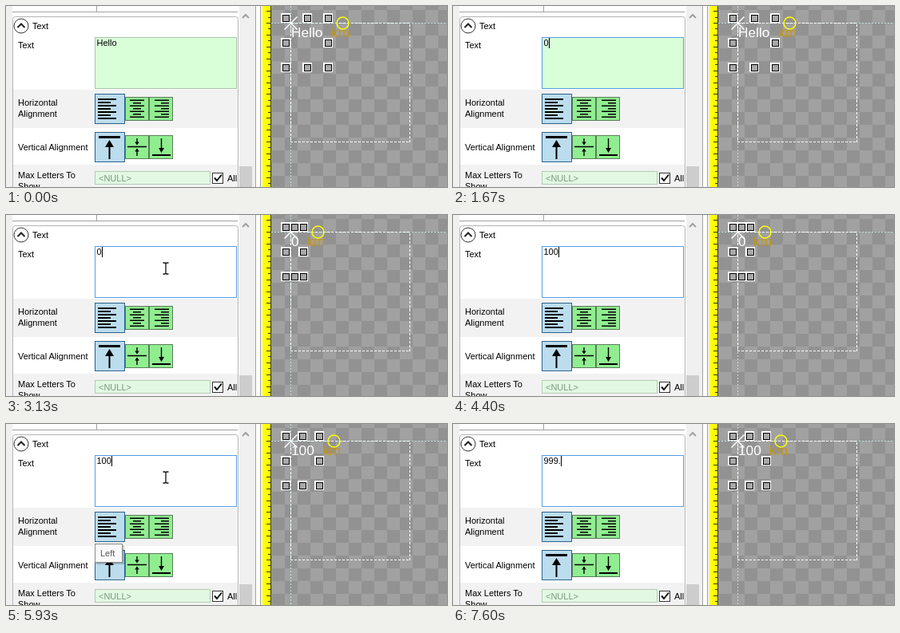
These frames come from a looping animation (552x227 px, 8 s). An HTML page:

```html
<!DOCTYPE html>
<html lang="en">
<head>
<meta charset="utf-8">
<title>Text property editor</title>
<style>
  html, body { margin: 0; width: 100%; height: 100%; overflow: hidden; background: #fff; }
  svg { display: block; width: 552px; height: 227px; }
  text { font: 11px "Liberation Sans", Arial, sans-serif; white-space: pre; }
  .view text { font-size: 17.3px; }
  .crisp { shape-rendering: crispEdges; }
</style>
</head>
<body>
<svg viewBox="0 0 552 227">
  <defs>
    <pattern id="checks" x="333" y="5" width="32" height="32" patternUnits="userSpaceOnUse">
      <path fill="#a1a1a1" d="M0 0h32v32H0z"/>
      <path fill="#929292" d="M16 0h16v16H16zM0 16h16v16H0z"/>
    </pattern>
  </defs>

  <!-- property rows -->
  <g class="crisp">
    <path fill="#f0f0f0" d="M0 0h8v227H0zM308 0h5v227h-5zM319 0h2v227h-2z"/>
    <path fill="#f2f2f2" d="M9 105h282v48H9zM9 199h282v28H9z"/>
    <path fill="none" stroke="#a0a0a0" d="M113.500 0V7M8 7.500H290M312.500 0V227M318.500 0V227"/>
    <path fill="#f0f0f0" d="M292 0h16v227h-16z"/>
    <path fill="#cdcdcd" d="M292 201h16v26h-16z"/>
  </g>
  <rect x="8.500" y="13.500" width="282" height="240" rx="3" fill="none" stroke="#b4b4b4"/>
  <path fill="none" stroke="#a0a0a0" stroke-width="2" d="M296 15l4-4 4 4"/>
  <circle cx="19" cy="25" r="9" fill="#fff" stroke="#333"/>
  <path fill="none" stroke="#222" stroke-width="2" d="M14.500 27l4.500-4.500 4.500 4.500"/>
  <text x="33" y="29">Text</text>
  <text x="15" y="53">Text</text>
  <text x="15" y="125">Horizontal</text>
  <text x="15" y="139">Alignment</text>
  <text x="15" y="181">Vertical Alignment</text>
  <text x="15" y="216">Max Letters To</text>
  <text x="15" y="230">Show</text>

  <!-- text box -->
  <g class="crisp">
    <rect id="box" x="111.500" y="39.500" width="177" height="64"/>
    <rect id="sel" x="114" y="40" height="13" fill="#0078d7" opacity=".4"/>
    <rect id="caret" y="40" width="1" height="13"/>
  </g>
  <text id="input" x="113.500" y="50"></text>

  <!-- alignment buttons -->
  <g id="buttons" class="crisp"></g>
  <rect id="dots" class="crisp" x="113.500" y="112.500" width="33" height="33" fill="none" stroke="#222" stroke-dasharray="1 1"/>
  <g id="lines"></g>
  <g stroke="#000" fill="none">
    <path stroke-width="3" d="M116 164.500h27"/>
    <path stroke-width="2" d="M129.500 192v-17M183 187h23"/>
    <path stroke-width="1.400" d="M152 176.500h24M164 166v6M164 188v-6M194.500 166v14"/>
  </g>
  <path d="M129.500 168l5.500 9h-11zM164 174.500l2.800-4h-5.600zM164 178.500l2.800 4h-5.600zM194.500 184l3.500-6h-7z"/>

  <g class="crisp">
    <rect x="111.500" y="207.500" width="144" height="16" fill="#e2f8e2" stroke="#b5c9b5"/>
    <rect x="258.500" y="209.500" width="13" height="13" fill="#fff" stroke="#333"/>
  </g>
  <path fill="none" stroke="#111" stroke-width="2" d="M261 215.500l3 3.500 6-7.500"/>
  <text x="116" y="220" fill="#7c987c">&lt;NULL&gt;</text>
  <text x="277" y="220">All</text>

  <g id="tip">
    <rect x="113" y="152" width="35" height="24" opacity=".2"/>
    <rect class="crisp" x="111.500" y="150.500" width="34" height="23" fill="#f9f9f9" stroke="#8a8a8a"/>
    <text x="118" y="166" fill="#575757">Left</text>
  </g>

  <!-- ruler and preview -->
  <g class="crisp">
    <path fill="#ff0" d="M321 0h10v227h-10z"/>
    <path id="ticks" stroke="#333" fill="none"/>
    <path fill="url(#checks)" d="M332 0h220v227H332z"/>
    <path stroke="#333" d="M331.500 0v227"/>
    <path stroke="#c4dfe2" stroke-dasharray="2 2" d="M332 21.500H552M356.500 0V227"/>
    <rect x="356.500" y="21.500" width="149" height="149" fill="none" stroke="#fff" stroke-dasharray="3 2"/>
  </g>
  <g class="view">
    <path stroke="#fff" stroke-width="1.500" d="M348.500 13.500l16 16M348.500 29.500l16-16"/>
    <text id="value" x="357" y="39" fill="#fff"></text>
    <text id="unit" y="39" fill="#c8960c">km</text>
    <g id="handles" class="crisp"></g>
    <circle id="knob" cy="21.500" r="7.500" fill="none" stroke="#ff0" stroke-width="1.500"/>
  </g>

  <path id="beam" fill="none" stroke="#111" stroke-width="1.300" d="M-3.500-7h2.500l1 1 1-1h2.500M0-6v12M-3.500 7h2.500l1-1 1 1h2.500"/>
  <path id="arrow" fill="#fff" stroke="#000" d="M.5.500v16l3.700-3.500 2.500 5.700 2.500-1-2.500-5.700h5z"/>
</svg>

<script>
const $ = id => document.getElementById(id);
const set = (id, attrs) => {
  for (const name in attrs) $(id).setAttribute(name, attrs[name]);
};
const show = (id, on) => set(id, { visibility: on ? 'visible' : 'hidden' });
const rect = (x, y, w, h, fill, stroke = 'none') =>
  `<rect x="${x}" y="${y}" width="${w}" height="${h}" fill="${fill}" stroke="${stroke}"/>`;

// Static repeats
let buttons = '', lines = '', ticks = '';
for (const y of [110, 158]) {
  buttons += rect(149.5, y + 4.5, 29, 29, '#90ee90', '#5a7d5a')
    + rect(179.5, y + 4.5, 29, 29, '#90ee90', '#5a7d5a')
    + rect(111.5, y + .5, 37, 37, '#bcddee', '#2c628b');
}
for (let i = 0; i < 7; i++) {
  const w = i % 2 ? 10 : 18, y = 117.5 + 3.5 * i;
  lines += rect(115, 116 + 4 * i, i % 2 ? 16 : 23, 2, '#000')
    + rect(164 - w / 2, y, w, 1.5, '#000')
    + rect(204 - w, y, w, 1.5, '#000');
}
for (let i = -2; i < 28; i++) ticks += `M331 ${21.5 + 7.45 * i}h${i % 2 ? -3 : -5}`;
$('buttons').innerHTML = buttons;
$('lines').innerHTML = lines;
set('ticks', { d: ticks });

// State changes: [ms, changed properties]
const idle = { text: 'Hello', value: 'Hello', width: 53, beam: 0, hover: 0, focus: 0, caret: 0, sel: 0, white: 0, tab: 0 };
const select = { sel: 1, caret: 0 };
const click = { focus: 1, caret: 1, tab: 0 };
const type = text => ({ text, sel: 0, caret: 1, beam: 0 });
const leave = { focus: 0, caret: 0, tab: 1, beam: 1 };
const events = [
  [330, { beam: 1, hover: 1 }], [730, click], [930, select],
  [1670, type('0')],
  [2200, { ...leave, value: '0', width: 22, white: 1 }],
  [3130, click], [3270, select],
  [4130, type('1')], [4200, type('10')], [4400, type('100')],
  [4870, leave], [4930, { value: '100', width: 42 }],
  [5930, click], [6130, select],
  [6800, type('9')], [7000, type('99')], [7130, type('999')], [7600, type('999.')]
];

// Pointer path: [ms, x, y]
const path = [[130, 543, 96], [330, 259, 54], [600, 228, 57], [2670, 228, 57], [3000, 200, 67], [8000, 200, 67]];
function pointer(t) {
  const i = Math.max(1, path.findIndex(p => p[0] >= t));
  const [a, b] = [path[i - 1], path[i]];
  const k = Math.max(0, (t - a[0]) / (b[0] - a[0]));
  return [1, 2].map(j => Math.round(a[j] + (b[j] - a[j]) * k));
}

function draw(now) {
  const t = Math.round(Math.floor((now % 8000 + 5) * .015) / .15) * 10;
  const s = { ...idle };
  for (const [at, change] of events) if (t >= at) Object.assign(s, change);

  $('input').textContent = s.text;
  const len = $('input').getComputedTextLength();
  set('box', {
    fill: s.white ? '#fff' : '#d9ffd9',
    stroke: s.focus ? '#569de5' : s.hover ? '#7eb4ea' : '#abc3ae'
  });
  set('sel', { width: Math.round(len) });
  set('caret', { x: Math.round(113.5 + len) });
  show('sel', s.sel);
  show('caret', s.caret);
  show('dots', s.tab);
  set('tip', { opacity: t < 5930 ? 0 : Math.max(0, 1 - (t - 5930) / 200) });

  $('value').textContent = s.value;
  set('unit', { x: 354 + s.width });
  set('knob', { cx: 368.5 + s.width });
  let handles = '';
  for (const y of [9, 40, 71]) for (const k of [0, .5, 1]) {
    if (y === 40 && k === .5) continue;
    const x = 344 + Math.round(s.width * k);
    handles += rect(x, y, 12, 12, '#fff') + rect(x + 2.5, y + 2.5, 8, 8, '#a8a8a8', '#000');
  }
  $('handles').innerHTML = handles;

  const [x, y] = pointer(t);
  set('beam', { transform: `translate(${x} ${y})` });
  set('arrow', { transform: `translate(${x} ${y})` });
  show('beam', s.beam);
  show('arrow', t >= 130 && t < 330);
}

const start = performance.now();
(function loop() {
  draw(performance.now() - start);
  requestAnimationFrame(loop);
})();
</script>
</body>
</html>
```
